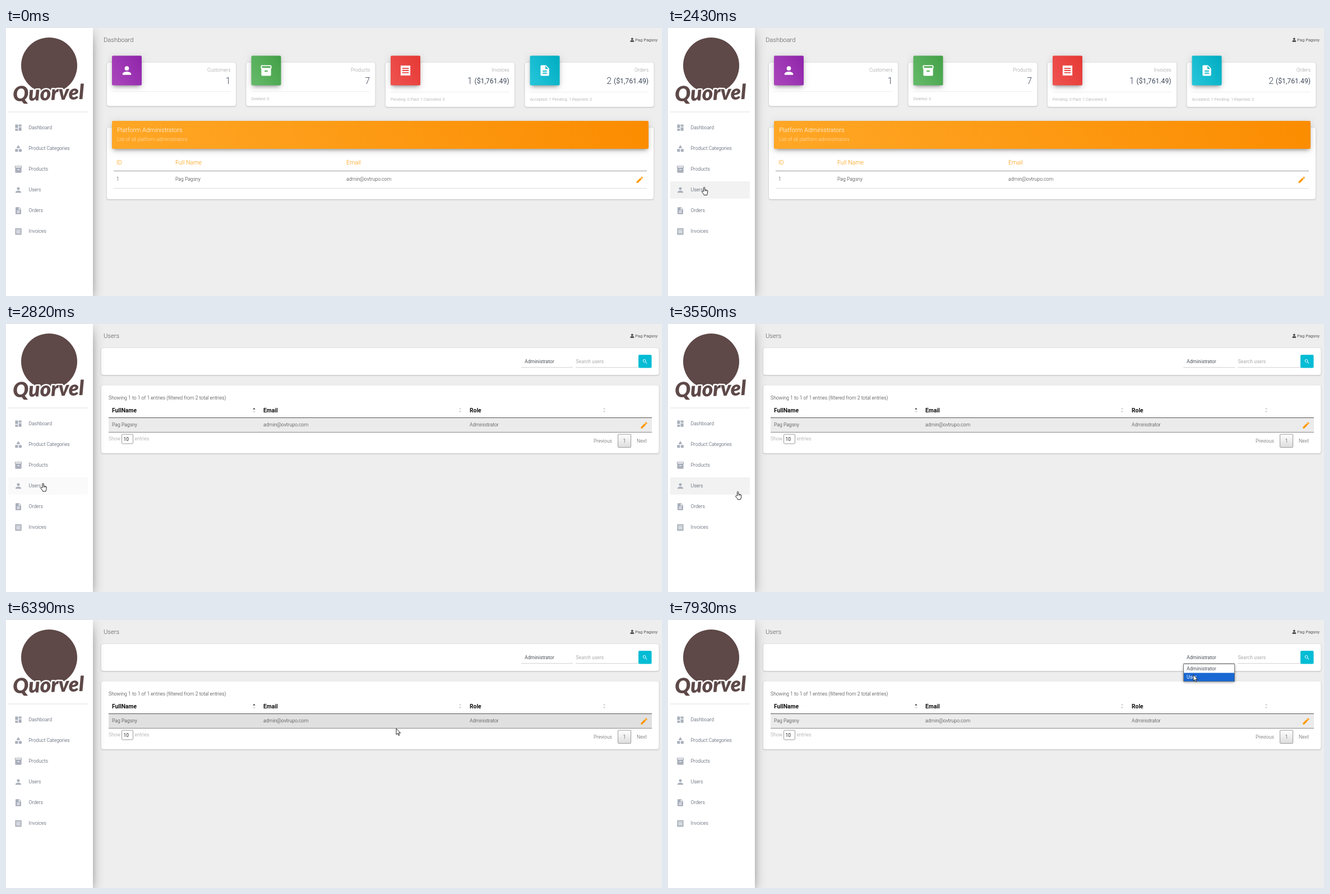
These frames come from a looping animation (1170 px wide and 479 px high, 8 s). An HTML page with a canvas:

```html
<!DOCTYPE html>
<html lang="en">
<head>
<meta charset="utf-8">
<title>Admin dashboard</title>
<style>
html, body { margin: 0; width: 100%; height: 100%; overflow: hidden; background: #eee; }
canvas { display: block; width: 100vw; height: 100vh; }
</style>
</head>
<body>
<canvas id="stage" width="1170" height="479"></canvas>
<script>
const W = 1170, H = 479, LOOP = 8000;
const ctx = document.getElementById('stage').getContext('2d');

const PERSON = 'Pag Pagsny', MAIL = 'admin@ovtrupo.com', BRAND = 'Quorvel';
const USERS_AT = 2630, TABLE_AT = 2690, MENU_AT = 7320;
const DARK = '#333', GREY = '#999', BROWN = '#5e4848', ORANGE = '#ff9800';

// Icons on a 24 unit grid
const ICONS = {
  dashboard: 'M3 13h8V3H3zM3 21h8v-6H3zM13 21h8V11h-8zM13 3v6h8V3z',
  category: 'M12 2l-5.5 9h11zM3 13.5h8v8H3zM22 17.5a4.5 4.5 0 1 1-9 0a4.5 4.5 0 1 1 9 0z',
  box: 'M20 2H4c-1 0-2 .9-2 2v3c0 .7.4 1.3 1 1.7V20c0 1.1 1.1 2 2 2h14c.9 0 2-.9 2-2V8.7c.6-.4 1-1 1-1.7V4c0-1.1-1-2-2-2zM15 14H9v-2h6zM20 7H4V4h16z',
  user: 'M12 12a4 4 0 1 0 0-8a4 4 0 1 0 0 8zM12 14c-2.67 0-8 1.34-8 4v2h16v-2c0-2.66-5.33-4-8-4z',
  file: 'M14 2H6c-1.1 0-2 .9-2 2v16c0 1.1.9 2 2 2h12c1.1 0 2-.9 2-2V8zM16 18H8v-2h8zM16 14H8v-2h8zM13 9V3.5L18.5 9z',
  receipt: 'M3 2' + 'l1.5 1.5l1.5-1.5'.repeat(6) + 'v20' + 'l-1.5-1.5l-1.5 1.5'.repeat(6) +
    'zM6 7h12v2H6zM6 11h12v2H6zM6 15h12v2H6z',
  edit: 'M3 17.25V21h3.75L17.81 9.94l-3.75-3.75zM20.71 7.04c.39-.39.39-1.02 0-1.41l-2.34-2.34c-.39-.39-1.02-.39-1.41 0l-1.83 1.83 3.75 3.75z',
  search: 'M15.5 14h-.8l-.3-.3A6.5 6.5 0 1 0 13.7 14.4l.3.3v.8l5 5L20.5 19zM9.5 14a4.5 4.5 0 1 1 0-9a4.5 4.5 0 1 1 0 9z'
};
for (const name in ICONS) ICONS[name] = new Path2D(ICONS[name]);

const ARROW = new Path2D('M0 0V10.8L2.5 8.5L4.2 12.4L5.9 11.7L4.2 7.9H7.6z');
const HAND = new Path2D('M3.5 8V1.5a1.1 1.1 0 0 1 2.2 0V5l3.6.8q1.7.4 1.6 2L10.2 12l-.7 2.7H4.3L3.5 12.7L.6 9.4q-.4-1.5 1-1.6z');

// Pointer legs: start, end, number of steps, place reached
const LEGS = [
  [1420, 1960, 9, 64.5, 284],
  [2760, 3420, 10, 116.5, 299],
  [3500, 3550, 2, 124.5, 299],
  [4150, 4750, 10, 277, 321],
  [5420, 5950, 8, 610, 103],
  [6020, 6180, 3, 672, 160],
  [6250, 6390, 3, 696, 194],
  [6456, 7050, 10, 917, 95],
  [7120, 7120, 1, 924, 72],
  [7320, 7930, 10, 937, 98]
];

const clamp = v => Math.max(0, Math.min(1, v));
const ramp = (t, start, span) => clamp((t - start) / span);
const smooth = p => p * p * (3 - 2 * p);

function pointer(t) {
  let x = 316, y = 474;
  for (const [start, end, n, tx, ty] of LEGS) {
    if (t < start) break;
    const k = n > 1 ? Math.floor(ramp(t, start, end - start) * (n - 1) + 1e-6) : 0;
    const p = smooth((k + 1) / n);
    x += (tx - x) * p;
    y += (ty - y) * p;
  }
  return { x, y, shown: t >= LEGS[0][0] };
}

function text(s, x, y, size, color = DARK, weight = 300, align = 'left') {
  ctx.font = `${weight} ${size}px Roboto, sans-serif`;
  ctx.textAlign = align;
  ctx.fillStyle = color;
  ctx.fillText(s, x, y);
}

function box(x, y, w, h, fill, r = 0) {
  ctx.beginPath();
  ctx.roundRect(x, y, w, h, r);
  ctx.fillStyle = fill;
  ctx.fill();
}

function frame(x, y, w, h, color, r = 0) {
  ctx.beginPath();
  ctx.roundRect(x + .5, y + .5, w - 1, h - 1, r);
  ctx.lineWidth = 1;
  ctx.strokeStyle = color;
  ctx.stroke();
}

const line = (x1, x2, y, color) => box(x1, y, x2 - x1, 1, color);

// Only the shadow lands on the stage; its caster sits far to the left
function shadow(x, y, w, h, dy, blur, spread, alpha) {
  ctx.save();
  ctx.shadowColor = `rgba(0,0,0,${alpha})`;
  ctx.shadowBlur = blur;
  ctx.shadowOffsetX = 3000;
  ctx.shadowOffsetY = dy;
  box(x - spread - 3000, y - spread, w + 2 * spread, h + 2 * spread, '#000', 3);
  ctx.restore();
}

function icon(name, cx, cy, size, color) {
  ctx.save();
  ctx.translate(cx - size / 2, cy - size / 2);
  ctx.scale(size / 24, size / 24);
  ctx.fillStyle = color;
  ctx.fill(ICONS[name], 'evenodd');
  ctx.restore();
}

function card(x, y, w, h) {
  shadow(x, y, w, h, .7, 2.5, 0, .25);
  box(x, y, w, h, '#fff', 3.7);
}

function badge(x, y, w, h, from, to) {
  shadow(x, y, w, h, 2.5, 12, 0, .16);
  shadow(x, y, w, h, 4.5, 6, -3, .35);
  // 60 degree gradient across the badge
  const len = (w * .866 + h * .5) / 2, cx = x + w / 2, cy = y + h / 2;
  const g = ctx.createLinearGradient(cx - len * .866, cy + len * .5, cx + len * .866, cy - len * .5);
  g.addColorStop(0, from);
  g.addColorStop(1, to);
  box(x, y, w, h, g, 2);
}

function logo() {
  ctx.beginPath();
  ctx.arc(77, 67, 50, 0, 7);
  ctx.fillStyle = BROWN;
  ctx.fill();
  ctx.save();
  ctx.translate(76, 129);
  ctx.rotate(-.03);
  ctx.font = 'italic 900 37px Lato, sans-serif';
  ctx.textAlign = 'center';
  ctx.lineJoin = 'round';
  ctx.lineWidth = 5;
  ctx.strokeStyle = '#fff';
  ctx.strokeText(BRAND, 0, 0);
  ctx.fillStyle = BROWN;
  ctx.fillText(BRAND, 0, 0);
  ctx.restore();
}

function sidebar(hover) {
  shadow(0, 0, 155, H, 10, 23.6, -7.5, .56);
  shadow(0, 0, 155, H, 2.5, 15.5, 0, .12);
  box(0, 0, 155, H, '#fff');
  logo();
  line(4, 146, 149.5, '#dedede');
  if (hover > 0) box(4, 274, 142, 31, `rgba(200,200,200,${.23 * hover})`, 2);
  [['Dashboard', 'dashboard'], ['Product Categories', 'category'], ['Products', 'box'],
   ['Users', 'user'], ['Orders', 'file'], ['Invoices', 'receipt']].forEach(([label, name], i) => {
    const y = 177.7 + i * 37.1;
    icon(name, 22, y + .5, 15, '#a9afbb');
    text(label, 40.5, y + 3.2, 8.7, '#3c4858');
  });
}

function topBar(title) {
  text(title, 174, 25.3, 11.2, '#555');
  ctx.beginPath();
  ctx.arc(1116.8, 19.3, 1.9, 0, 7);
  ctx.fillStyle = '#555';
  ctx.fill();
  box(1113.6, 21.5, 6.4, 3.5, '#555', [1.8, 1.8, .5, .5]);
  text(PERSON, 1162, 24.3, 7.6, '#555', 400, 'right');
}

function statCard(i, name, from, to, label, count, sum, note) {
  const x = 180 + i * 248.5, low = sum ? 1 : 0, right = x + 220.5;
  card(x, 62, 230, 77.5 + low * 1.5);
  badge(x + 9, 49.5, 53, 53, from, to);
  icon(name, x + 35.5, 76, 23, '#fff');
  text(label, right, 78, 8.6, GREY, 300, 'right');
  text(count, sum ? right - 66 : right, 99.5, 16, '#3c4858', 300, 'right');
  if (sum) text(sum, right, 99, 12.2, '#3c4858', 400, 'right');
  line(x + 9, right, 113 + low, '#eee');
  text(note, x + 9, 129 + low * 1.3, 7.4, GREY);
}

function dashboard() {
  topBar('Dashboard');
  statCard(0, 'user', '#ab47bc', '#8e24aa', 'Customers', '1', '', '');
  statCard(1, 'box', '#66bb6a', '#43a047', 'Products', '7', '', 'Deleted: 0');
  statCard(2, 'receipt', '#ef5350', '#e53935', 'Invoices', '1', '($1,761.49)', 'Pending: 0 Paid: 1 Canceled: 0');
  statCard(3, 'file', '#26c6da', '#00acc1', 'Orders', '2', '($1,761.49)', 'Accepted: 1 Pending: 1 Rejected: 0');

  card(180, 178, 975, 128);
  badge(189, 166, 957, 50, '#ffa726', '#fb8c00');
  text('Platform Administrators', 198, 186, 11.1, '#fff');
  text('List of all platform administrators', 198, 202, 8.65, 'rgba(255,255,255,.7)');
  [['ID', '1', 197], ['Full Name', PERSON, 302], ['Email', MAIL, 607]].forEach(([head, value, x]) => {
    text(head, x, 244, 10.6, ORANGE);
    text(value, x, 273.3, 8.7);
  });
  line(192, 1143, 255, '#999');
  line(192, 1143, 286, '#ddd');
  icon('edit', 1130.3, 271.3, 15, ORANGE);
}

function sortMarks(x, up) {
  [[-1, 152.6, up], [1, 155.4, '#ccc']].forEach(([dir, y, color]) => {
    ctx.beginPath();
    ctx.moveTo(x - 2.3, y);
    ctx.lineTo(x + 2.3, y);
    ctx.lineTo(x, y + dir * 2.5);
    ctx.fillStyle = color;
    ctx.fill();
  });
}

function emptyTable() {
  card(170, 109.5, 994.5, 58.5);
  [['FullName', 188], ['Email', 591], ['Role', 857]].forEach(([s, x]) => text(s, x, 137, 10.6));
  line(183, 1152, 148, '#e8e8e8');
}

function fullTable(rowHover) {
  card(170, 109.5, 994.5, 121.5);
  text('Showing 1 to 1 of 1 entries (filtered from 2 total entries)', 183, 135.2, 8.7);
  box(183, 168, 969, 25, rowHover ? '#e0e0e0' : '#ebebeb');
  line(183, 1152, 167, '#555');
  line(183, 1152, 193, '#888');
  [['FullName', PERSON, 189, 442.5, '#333'], ['Email', MAIL, 459, 810, '#ccc'],
   ['Role', 'Administrator', 827, 1067, '#ccc']].forEach(([head, value, x, mark, up]) => {
    text(head, x, 157.6, 10.3, '#111', 700);
    sortMarks(mark, up);
    text(value, x, 183.3, 8.7);
  });
  icon('edit', 1138, 181, 15, ORANGE);

  text('Show', 183, 208.3, 8.7, GREY);
  frame(206, 196.5, 21, 18, '#999', 2);
  text('10', 209.5, 208.5, 8.5, '#222', 400);
  text('entries', 229.5, 208.3, 8.7, GREY);

  text('Previous', 1048, 211.5, 8.7, '#555');
  const g = ctx.createLinearGradient(0, 197, 0, 221);
  g.addColorStop(0, '#fff');
  g.addColorStop(1, '#dcdcdc');
  box(1091, 196.5, 24, 24.5, g, 1);
  frame(1091, 196.5, 24, 24.5, '#999', 1);
  text('1', 1103, 211.5, 8.7, DARK, 300, 'center');
  text('Next', 1125, 211.5, 8.7, '#555');
}

function dropdown(second) {
  shadow(919, 78, 92, 32, 1.5, 4, 0, .35);
  box(919, 78, 92, 32.5, '#fff');
  box(919, second ? 94.5 : 79, 92, 15.5, '#1967d2');
  frame(919, 78, 92, 32.5, '#767676');
  text('Administrator', 925, 89.8, 8.7, second ? '#495057' : '#fff', 400);
  text('User', 925, 105.3, 8.7, second ? '#fff' : '#495057', 400);
}

function users(t, p) {
  topBar('Users');
  card(170, 43, 994.5, 48);
  text('Administrator', 925, 70, 8.7, '#495057', 400);
  line(919, 1011, 77, '#d2d2d2');
  text('Search users', 1016.5, 70, 8.65, '#aaa', 400);
  line(1016, 1128, 77, '#d2d2d2');
  box(1128, 55, 23.5, 23.5, '#00bcd4', 2);
  icon('search', 1139.7, 67, 10.5, '#fff');

  if (t < TABLE_AT) emptyTable();
  else fullTable(p.x > 183 && p.x < 1152 && p.y >= 168 && p.y <= 194.5 && t < MENU_AT);
  if (t >= MENU_AT) dropdown(p.y > 94);
}

function drawPointer({ x, y, shown }) {
  if (!shown) return;
  const hand = x < 146 && y > 162 && y < 380;
  const shape = hand ? HAND : ARROW;
  ctx.save();
  ctx.translate(hand ? x - 4.5 : x, y);
  ctx.lineJoin = 'round';
  ctx.lineWidth = 1;
  ctx.fillStyle = '#fff';
  ctx.strokeStyle = '#222';
  ctx.fill(shape);
  ctx.stroke(shape);
  if (hand) {
    ctx.beginPath();
    for (const fx of [5.7, 7.4, 9]) {
      ctx.moveTo(fx, 5.5);
      ctx.lineTo(fx, 7.8);
    }
    ctx.lineWidth = .7;
    ctx.stroke();
  }
  ctx.restore();
}

function draw(t) {
  const p = pointer(t);
  const hover = t < USERS_AT ? ramp(t, 1830, 150) : ramp(t, 2760, 150) - ramp(t, 4270, 150);
  box(0, 0, W, H, '#eee');
  if (t < USERS_AT) dashboard();
  else users(t, p);
  sidebar(hover);
  drawPointer(p);
}

const began = performance.now();
function tick() {
  draw((performance.now() - began) % LOOP);
  requestAnimationFrame(tick);
}
tick();
</script>
</body>
</html>
```
